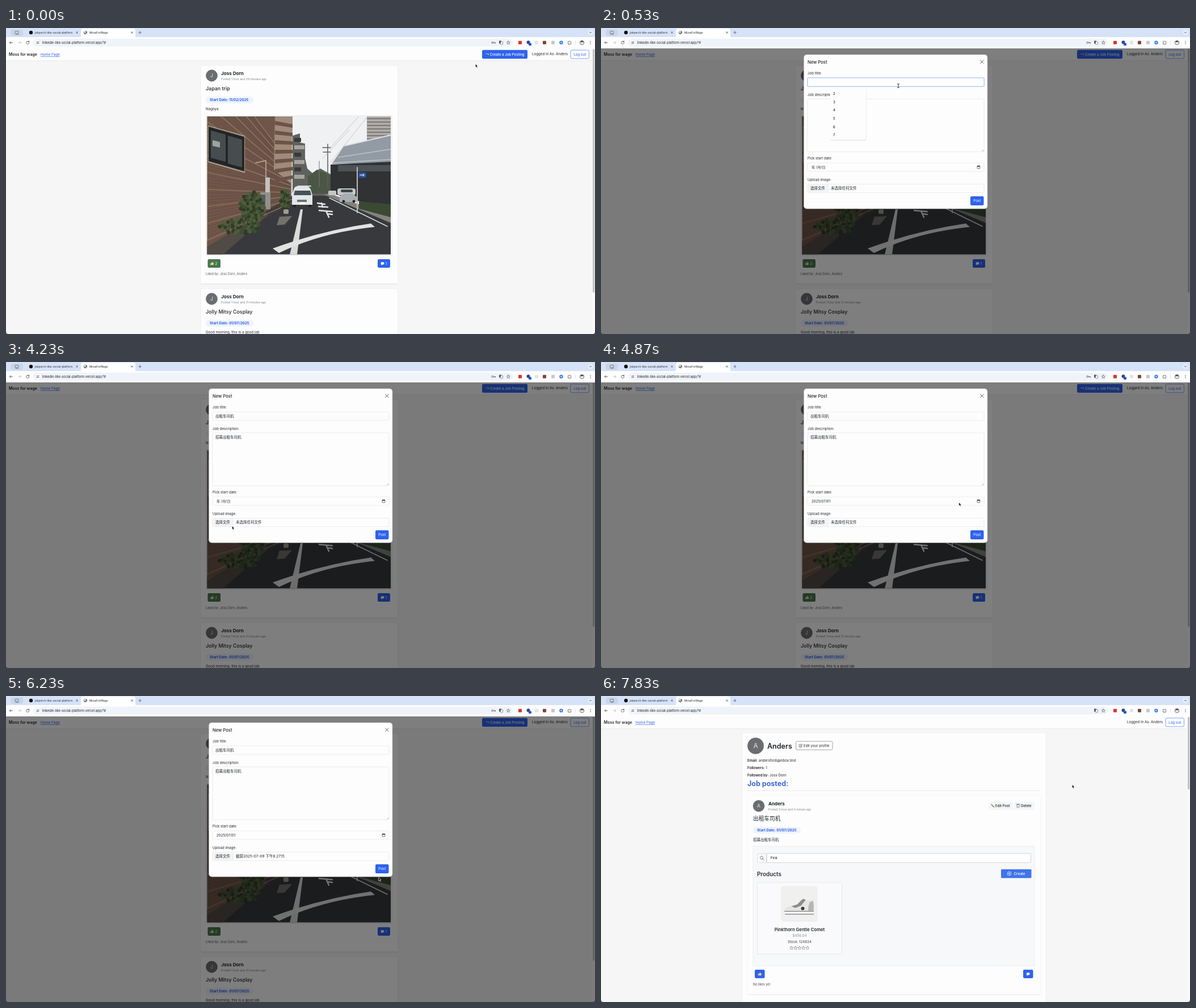
Recreate the animation shown at these times as an HTML page. Size 1038x540 px, loop 7860 ms.

```html
<!DOCTYPE html>
<html lang="en">
<head>
<meta charset="utf-8">
<title>MossForWage</title>
<style>
html, body { margin: 0; width: 100%; height: 100%; overflow: hidden; background: #f6f6f7; }
svg { display: block; width: 1038px; height: 540px; }
text { font-family: Inter, "Noto Sans CJK SC", "Noto Sans CJK", "Noto Sans", sans-serif; white-space: pre; }
</style>
</head>
<body>
<svg id="stage" viewBox="0 0 1038 540"></svg>
<script>
const INK = '#212529', BLUE = '#2f63ed', PAPER = '#fdfdfd', LINE = '#dfe1e4';
const USER = 'Anders', AUTHOR = 'Joss Dorn';
const HAN = '出租车司机', HAN_DESC = '招募出租车司机', SHOT = '下午8.27.15';

// Drawing helpers
const text = (x, y, s, size = 6.2, fill = INK, weight = 400, anchor = 'start', extra = '') =>
  `<text x="${x}" y="${y}" font-size="${size}" fill="${fill}" font-weight="${weight}" text-anchor="${anchor}" ${extra}>${s}</text>`;
const mid = (x, y, s, size, fill, weight) => text(x, y, s, size, fill, weight, 'middle');
const box = (x, y, w, h, fill, r = 0, stroke = 'none', extra = '') =>
  `<rect x="${x}" y="${y}" width="${w}" height="${h}" rx="${r}" fill="${fill}" stroke="${stroke}" stroke-width=".6" ${extra}/>`;
const dot = (x, y, r, fill, stroke = 'none', w = .8) =>
  `<circle cx="${x}" cy="${y}" r="${r}" fill="${fill}" stroke="${stroke}" stroke-width="${w}"/>`;
const shape = (d, fill) => `<path d="${d}" fill="${fill}"/>`;
const line = (d, stroke = INK, w = .8) =>
  `<path d="${d}" fill="none" stroke="${stroke}" stroke-width="${w}" stroke-linecap="round" stroke-linejoin="round"/>`;
const group = (id, body, extra = '') => `<g id="${id}" ${extra}>${body}</g>`;
const repeat = (n, fn) => Array.from({ length: n }, (_, i) => fn(i)).join('');

const cross = (x, y, r, c = '#444', w = .7) =>
  line(`M${x - r} ${y - r}l${2 * r} ${2 * r}m0 ${-2 * r}l${-2 * r} ${2 * r}`, c, w);
const avatar = (x, y, r, s) => dot(x, y, r, '#6c6d71') + mid(x, y + r * .28, s, r * .82, '#e6e6e6');
const badge = (x, y, date) => box(x, y, 84, 12, '#eef3fd', 6) +
  text(x + 7, y + 8.2, `Start Date: ${date}`, 6.25, '#2d5fe3', 650);
const thumb = (x, y, c) =>
  shape(`M${x - 3} ${y - .5}h1.6v3.2h-1.6zM${x - 1} ${y - .5}l1.5-2.5q1.2 0 .6 2h1.8q.7.3.2 1.4l-.6 1.8q-.3.6-1 .6h-2.5z`, c);
const bubble = (x, y, c = '#fff') =>
  `<ellipse cx="${x}" cy="${y}" rx="2.9" ry="2.3" fill="${c}"/>` + shape(`M${x - 2} ${y + 1}l-.4 2.2 2.4-1z`, c);
const lens = (x, y, r, c) => dot(x, y, r, 'none', c, .7) + line(`M${x + r * .7} ${y + r * .7}l${r * .9} ${r * .9}`, c, .7);

function chrome() {
  const ext = [[906, '#d8332c'], [935, '#e2e4e6'], [949, '#7b4433'], [964, '#c4c8cc']];
  return box(0, 0, 1038, 17, '#d5e2f8') +
    box(8, 2.5, 22, 11.5, '#c9d5e8', 4) + box(16, 5.5, 6, 4.4, 'none', .8, '#444') + line('M17 11.2h5', '#444', .6) +
    dot(44, 8, 3.2, '#111') + text(50.5, 10, 'jobperch-like-social-platform', 4.85, '#333') + cross(125, 8, 1.5) +
    shape('M129 17q3 0 3-3v-9q0-4 4-4h88q4 0 4 4v9q0 3 3 3z', '#fff') +
    dot(140, 8, 3, '#5f6368') + shape('M138 6q2-1 3 0l-1 2-2 1zM140 9l2-.5-.5 2z', '#fff') +
    text(147, 10, 'MossForWage', 4.8, '#222') + cross(222, 8, 1.5) +
    line('M236 5.8v4.4m-2.2-2.2h4.4', '#444', .7) +
    dot(1030, 8, 5, '#e3ecfb') + line('M1028.5 7.3l1.5 1.5 1.5-1.5', '#333') +
    box(0, 16, 1038, 20, PAPER) + box(48, 19, 845, 13.5, '#eff3fa', 6.7) +
    line('M11.5 25.8h-5m2-2l-2 2 2 2', '#444') + line('M21.5 25.8h5m-2-2l2 2-2 2', '#b5b7ba') +
    line('M40.2 24.2a2.6 2.6 0 1 0 .6 2M40.6 22.8v1.9h-1.9', '#444') +
    dot(56, 25.8, 4.4, '#fff') + line('M53.8 24.6h2.6m1.6 0h.2M53.8 27.2h.2m1.8 0h2.6', '#444', .7) +
    dot(57, 24.6, .8, '#fff', '#444', .6) + dot(55, 27.2, .8, '#fff', '#444', .6) +
    text(64, 27.8, 'linkedin-like-social-platform.vercel.app/?#', 5.6, '#222') +
    group('key', dot(857.3, 25.8, 1.5, 'none', '#555') + line('M859 25.8h3.6v1.3m-1.4-1.3v1', '#555')) +
    box(869, 22.5, 4, 5, '#555', .6) + box(871.5, 24, 4, 5, PAPER, .6, '#555') +
    line('M885.3 22.8l.9 2 2.1.2-1.6 1.4.5 2.1-1.9-1.1-1.9 1.1.5-2.1-1.6-1.4 2.1-.2z', '#444', .6) +
    ext.map(([x, c]) => box(x - 3, 22.8, 6, 6, c, 1)).join('') +
    dot(920.5, 25.2, 3, '#274a8e') + box(921, 26.5, 5, 4.5, '#2456c9', 1) +
    dot(978.5, 25.8, 3.2, '#3c7bea') + dot(978.5, 25.8, 1.2, '#dce8ff') +
    line('M991 23.8h1.4q.8-1.8 1.6 0h1.4v1.7q1.6.7 0 1.4v1.6h-4.4z', '#444', .7) +
    line('M1003.5 22.5v6.5', '#c7d6f2', .7) + dot(1015, 25.8, 3.7, '#e9e9e9', '#555', .8) + shape('M1012 25q3-5 6 0z', '#444') +
    repeat(3, i => dot(1030, 23.7 + i * 2.1, .65, '#444'));
}

function header() {
  return box(0, 36, 1038, 21.5, PAPER) + line('M0 57.7h1038', '#e4e5e7', .7) +
    text(5, 49, 'Moss for wage', 7, INK, 600) +
    text(61, 49, 'Home Page', 6.2, BLUE, 400, 'start', 'text-decoration="underline"') +
    group('create', box(839, 38.8, 80, 15.4, BLUE, 2.2) + box(845, 45, 6, 2.8, '#9fb3d8', .6) +
      box(845, 46.4, 4, 1.4, '#5c4a3c') + text(853, 48.7, 'Create a Job Posting', 6.1, '#fff', 500)) +
    text(990, 48.2, `Logged In As: ${USER}`, 6.2, INK, 400, 'end') +
    box(995, 39, 32.5, 15, PAPER, 2.2, BLUE) + mid(1011.2, 48.9, 'Log out', 6.2, BLUE);
}

function photo() {
  const bricks = repeat(58, i => {
    const y = 45 + i * 6;
    return line(`M354 ${y}L503 ${y + (292 - y) * .8}`, i % 5 ? '#5d463b' : '#917b69', i % 5 ? .6 : 1.2);
  });
  const leaf = (x, y, rx, ry, n, seed) => repeat(n, i => {
    const a = i * 2.4 + seed, k = Math.sqrt((i + .5) / n);
    return dot(x + Math.cos(a) * rx * k, y + Math.sin(a) * ry * k, 3.2, ['#2f3b28', '#4a5e37', '#3c4d30'][i % 3]);
  });
  return box(352.5, 154.5, 327.5, 247, '#f3f3f3', 1, '#e0e2e4') +
    `<clipPath id="pic"><rect x="354.5" y="156" width="323.5" height="243.5"/></clipPath><g clip-path="url(#pic)">` +
    box(354, 156, 324, 244, '#eff1f3') +
    // middle distance
    shape('M505 190l13-4v16l9 2v26l4 18 9 8 14-8 18 10 6 40h-73z', '#5f625c') +
    shape('M532 262l16-12 24 10v32h-40z', '#4c5646') +
    repeat(6, i => box(508, 194 + i * 13, 12 + i % 2 * 6, 7, i % 2 ? '#a7a49e' : '#363a3c')) +
    shape('M354 400V385L500 296H568L678 342V400z', '#37393c') +
    shape('M354 376L455 322 462 330 382 400H354z', '#514b46') +
    // brick building
    shape('M354 156H505L502 297 354 386z', '#705649') + bricks +
    shape('M474 156H505L503 275 472 250z', '#a08a79') +
    repeat(7, i => shape(`M474 ${164 + i * 17}L505 ${170 + i * 15}V${176 + i * 15}L474 ${171 + i * 17}z`, '#6d5347')) +
    shape('M356 172L421 190V256L356 237z', '#a79c90') + shape('M357 174L420 192V253L357 235z', '#232525') +
    shape('M361 181L387 188V236L361 229zM391 190L416 197V246L391 239z', '#474d4f') +
    shape('M364 198l13 3v10l-13-3z', '#9da39f') +
    line('M440 238l18-4v32', '#b39a86', 2) + box(457, 264, 8, 32, '#c3c2be') + box(448, 290, 18, 30, '#92918d') +
    box(449, 294, 8, 22, '#5b5c5a') +
    leaf(434, 316, 22, 27, 60, 0) + leaf(412, 350, 36, 14, 50, 1) + leaf(492, 304, 8, 20, 28, 2) +
    box(489, 320, 9, 8, '#a09a90', 2) + shape('M482 333l22-1-13 15-14 1z', '#73716b') +
    // right side
    box(636, 156, 42, 48, '#aeaba8') + repeat(7, i => line(`M637 ${160 + i * 6}h41`, '#7b7977', 2)) +
    shape('M574 240L596 208 678 189V238z', '#929aa4') + line('M586 228L678 214M576 238L678 232', '#bcc3ca', 1.5) +
    line('M596 208L678 189', '#dfe3e6', 2) +
    shape('M572 241L678 236V325L630 308 572 291z', '#303233') + box(585, 242, 93, 11, '#4d5256') +
    shape('M570 292L678 332V344L560 294z', '#83837e') + shape('M622 306L678 311V334L622 319z', '#3b4933') +
    box(584, 283, 32, 12, '#c8c9c9', 4) + box(590, 285, 21, 5, '#43484c', 2) +
    shape('M588 298l7-6h15l8 6v9h-30z', '#a7adb0') + dot(595, 306, 2.4, '#222') + dot(613, 306, 2.4, '#222') +
    box(568, 287, 14, 8, '#c6c8c8', 2) +
    line('M567 205V283M558 211h14m-13 8h13', '#5c5d5c', 1.5) + line('M552 235v45', '#777', 1) +
    line('M636 158L572 237M622 156L570 213M605 180L558 230', '#a6a9ac', .6) +
    line('M619 246V326', '#b9bcbd', 2) + box(621.5, 255, 13, 9, '#2a57ad', 1) + line('M624 259.5h7m-2-2l2 2-2 2', '#fff', 1) +
    // van and road paint
    shape('M507 285q1-5 6-6h17q5 1 7 6l3 10v17h-36v-17z', '#e4e6e7') + shape('M509 287h27l2 8h-31z', '#45515b') +
    line('M515 279h22', '#d8dadb', 2) + box(513, 303, 17, 4, '#6c7071') + box(518, 308, 8, 3, '#fff') +
    box(506, 312, 5, 4, '#222') + box(533, 312, 5, 4, '#222') +
    shape('M519 320h4L513 400h-13z', '#d9dbd9') + shape('M470 389L481 397Q555 361 650 351L643 345Q558 357 470 389z', '#e2e3e1') +
    line('M549 309l13 2m-11 4l16 1m-11-7l2 7m-6 6l23 2m-11-1l5 11m-1-6l7 1', '#e4e5e3', 2.4) +
    line('M570 300L672 350', '#d9dbd9', 1.5) + '</g>';
}

const card = (y, ago, title, date, body) =>
  box(343, y, 347.5, 385, PAPER, 2, '#e9eaec') + avatar(362.5, y + 18, 10.4, 'J') +
  text(379, y + 17, AUTHOR, 8.1, INK, 650) + text(379, y + 26.2, `Posted 1 hour and ${ago} minutes ago`, 5, '#7c7f83') +
  text(352, y + 44, title, 8.9, INK, 550) + badge(352, y + 55, date) + text(352, y + 79.3, body, 6.2);

function home() {
  return card(66, 29, 'Japan trip', '11/02/2025', 'Nagoya') + photo() +
    box(355.5, 408, 22.5, 15, '#47774f', 2.2) + thumb(363, 415.5, '#e9d9a0') + text(368.5, 417.8, '2', 6.2, '#fff') +
    box(655, 408, 22, 15, BLUE, 2.2) + bubble(663.5, 415.2) + text(668.5, 417.8, '1', 6.2, '#fff') +
    text(352, 436.2, `Liked by: ${AUTHOR}, ${USER}`, 5.5, '#5a5d61') + line('M343 452h348', '#e4e5e7', 1) +
    card(460, 31, 'Jolly Mitsy Cosplay', '01/07/2025', 'Good morning, this is a good job');
}

const shoe = (x, y, k) => `<g transform="translate(${x} ${y}) scale(${k})">` +
  shape('M-26 8q-1-6 7-8l15-4 9-9q4-2 7 1 6 3 12-1 2 8 1 21z', '#e4e4e2') +
  shape('M-14-1l10-3 9-9q4-2 6 1l-8 10-10 4z', '#8a8c8e') +
  shape('M19-9q4 0 5-2 2 8 1 19h-9q-1-8 3-17z', '#b4b5b4') + dot(6, 3, 3, '#33363a') +
  shape('M-26 7h51v6h-49q-3-2-2-6z', '#fafafa') + line('M-25 13h50M-26 8h51', '#55575a', 1.2) + '</g>';

function profile() {
  const fact = (y, k, v) => text(258, y, `<tspan font-weight="600">${k}:</tspan> ${v}`, 6.15);
  const star = i => line(`M${335.7 + i * 7} 441.4l.9 2.1 2.2.2-1.7 1.5.5 2.2-1.9-1.2-1.9 1.2.5-2.2-1.7-1.5 2.2-.2z`, '#777b80', .6);
  return box(249, 65, 535, 480, PAPER, 2, '#ecedef') + avatar(272.5, 88, 14.4, 'A') +
    text(293, 93, USER, 12.5, INK, 600) + box(343.5, 80, 64.5, 15, PAPER, 2.2, '#666') +
    box(349, 85, 5, 5.5, '#d4d6d8', 1, '#777') + line('M351.5 89l3.5-4', '#87755a') + text(357, 90, 'Edit your profile', 6.1) +
    fact(115.6, 'Email', 'andersford@inbox.test') + fact(128.6, 'Followers', '1') + fact(141.6, 'Followed by', AUTHOR) +
    text(258, 159, 'Job posted:', 12.5, '#3b67d7', 700) + line('M258 167h516', '#dcdee1', .7) +
    box(258, 174.5, 517, 352.5, PAPER, 2, '#f0f1f3') + avatar(278, 194, 10.3, 'A') +
    text(295, 193, USER, 8.1, INK, 650) + text(295, 202.2, 'Posted 0 hour and 0 minute ago', 5, '#7c7f83') +
    box(683, 187, 43, 14, '#f5f6f7', 2) + line('M688 191.5l4.5 4.5', '#88765f', 1.4) + text(695, 196.2, 'Edit Post', 6.1, INK, 500) +
    box(728, 187, 36, 14, '#f5f6f7', 2) + box(733, 191.7, 4, 5, '#eee', .5, '#555') + line('M732 191h6', '#555') + text(740, 196.2, 'Delete', 6.1, INK, 500) +
    text(268, 220, HAN, 9.7, INK, 500) + badge(268, 231, '01/07/2025') + text(268, 255.5, HAN_DESC, 6.5) +
    box(268, 264.8, 496, 211.5, '#f7f8fa', 1, '#e3e5e8') +
    box(275.5, 278, 16, 16, '#f9fafb', 1.5, '#c9ccd0') + lens(283, 285.4, 2.6, '#555') +
    box(292, 278, 465.5, 16, '#fff', 1.5, '#b4b7bb') + text(298.5, 288.4, 'Pink', 6.2) +
    text(275, 317.6, 'Products', 9.9, '#2b3036', 600) + box(705, 305.8, 53.5, 15.5, '#3f74ec', 1.5) +
    dot(719.5, 313.5, 3.4, 'none', '#fff', .7) + line('M719.5 311.8v3.4m-1.7-1.7h3.4', '#fff', .7) + text(727.5, 315.8, 'Create', 6.3, '#fff', 500) +
    box(275.5, 329, 149, 126.5, '#fafafc', 1.5, '#d9dce0') + box(318, 336, 63, 61.5, '#f0f0ef', 4, '#e6e6e6') +
    shoe(349.5, 372, 1) + mid(350, 415, 'Pinkthorn Gentle Comet', 7.7, INK, 600) + mid(350, 425, '$456.04', 6.2, '#8c9095') +
    mid(350, 435.6, 'Stock: 124834', 6.1, '#555a60', 500) + repeat(5, star) +
    box(271, 483, 17.5, 15, BLUE, 2.2) + thumb(279.7, 490.5, '#f3d784') + box(744, 483, 17.5, 15, BLUE, 2.2) + bubble(752.7, 490.2) +
    text(268, 511.4, 'No likes yet', 5.5, '#4c5055') + line('M258 527h516', '#e4e6e8', .7);
}

function modal() {
  const field = (y, h) => box(364, y, 311, h, PAPER, 2.2, LINE);
  const ring = (id, y, h) => group(id, box(363, y - 1, 313, h + 2, '#c7d7fb', 3) + box(364, y, 311, h, PAPER, 2.2, '#90b1f4'));
  return box(357.5, 47, 323.5, 272, PAPER, 5, '#b5b5b5') + text(364, 62.6, 'New Post', 7.6, INK, 500) + cross(671.3, 59.7, 2.8, '#333', .8) +
    text(364, 82.4, 'Job title:', 6.15) + field(88, 15) + ring('ringTitle', 88, 15) + text(369, 98, '', 6.5, INK, 500, 'start', 'id="title"') +
    text(364, 119.7, 'Job description:', 6.15) + field(125, 93.5) + ring('ringDesc', 125, 93.5) +
    text(369, 135.2, '', 6.5, INK, 400, 'start', 'id="desc"') + group('caret', line('M369.4 128.8v7.6', '#222', .6)) +
    line('M671.5 217.3l2.5-2.5M673 217.3l1-1', '#888', .5) +
    text(364, 232.2, 'Pick start date:', 6.15) + field(238, 15) + text(371, 248.2, '', 6.2, INK, 400, 'start', 'id="date"') +
    box(663, 243.4, 4.8, 4.8, 'none', .5, '#222') + box(663, 243, 4.8, 1.6, '#222') +
    text(364, 269.9, 'Upload image:', 6.15) + field(275.5, 15) + box(364.3, 275.8, 36, 14.4, '#f3f4f5', 2) + line('M400.5 276v14', LINE, .5) +
    text(369, 285.3, '选择文件', 6.5) + text(405, 285.3, '', 6.5, INK, 400, 'start', 'id="file"') +
    box(651, 297, 23.5, 16, BLUE, 2.2) + mid(662.7, 307.2, 'Post', 6.2, '#fff') +
    group('hints', box(404, 106, 63.5, 92.5, '#0002', 4) + box(404, 105.5, 63, 92, PAPER, 3.5) +
      repeat(6, i => text(409, 118.2 + i * 14.6, i + 2, 6, INK, 500)));
}

function dialog() {
  const small = (x, y, s, size = 5.2, fill = '#222', w = 400, anchor) => text(x, y + size * .36, s, size, fill, w, anchor);
  const head = (x, y, s) => small(x, y, s, 4.4, '#888');
  const side = [[198, '桌面'], [209.5, '最近使用'], [220.5, '应用程序'], [232, '文稿'], [243, '下载'],
    [268, 'Skyvel云盘'], [279, '共享'], [303.5, 'Brinto'], [315, '网络']];
  const files = [[223, 'DSC08622.JPG'], [232, 'nagoya_c.jpg'], [241, 'nagoya.jpg']];
  const folder = (x, y, c) => shape(`M${x - 2.7} ${y - 2}h2l.7.8h2.7v3.4h-5.4z`, c);
  const button = (x, w, s, blue) => box(x, 344, w, 9, blue ? '#2458d4' : '#fff', 2, blue ? 'none' : '#d2d2d2') +
    mid(x + w / 2, 350.5, s, 5.3, blue ? '#fff' : '#222', 500);
  return box(356.5, 178.7, 326, 183, '#0002', 5) + box(357, 179, 325, 182, PAPER, 4) +
    shape('M361 179H415V361H361q-4 0-4-4V183q0-4 4-4z', '#e8e8e9') + box(361, 192.3, 44, 11.2, '#d0d0d2', 2) +
    head(363, 188, '个人收藏') + head(363, 258.5, 'Skyvel') + head(363, 294, '位置') + head(363, 330, '标签') +
    side.map(([y, s]) => box(365.5, y - 1.8, 4.2, 3.6, '#9cbcf0', 1, '#2f6de0') + small(373, y, s)).join('') +
    dot(367.5, 339.3, 2, '#e5443c') + small(373, 339.5, '红色') + dot(367.5, 350.7, 2, '#f0923a') + small(373, 351, '橙色') +
    dot(367.5, 360, 1, '#f1c843') + box(410.5, 181, 3.2, 118, '#b5b5b7', 1.6) +
    line('M429 189.3l-2 2.2 2 2.2M437.5 189.3l2 2.2-2 2.2', '#c2c2c2', .7) +
    box(450, 189.2, 6, 4.6, 'none', .5, '#555') + line('M452 189.2v4.6m2-4.6v4.6', '#555', .5) + line('M459.5 191l1.2 1.2 1.2-1.2', '#555', .7) +
    repeat(6, i => box(472 + i % 3 * 2.1, 189.5 + (i > 2 ? 2.3 : 0), 1.5, 1.6, '#666')) + line('M480.7 191l1.2 1.2 1.2-1.2', '#555', .7) +
    box(507, 187, 85, 9, '#fff', 2, '#ededed') + folder(513, 191.7, '#3b8be8') + small(518, 191.5, '桌面') +
    box(583.5, 188.5, 6.4, 6, '#2c66dc', 1.5) + line('M585.5 191l1.2-1.2 1.2 1.2m-2.4 1.2l1.2 1.2 1.2-1.2', '#fff', .6) +
    box(611.5, 187, 62, 9, '#fff', 2, '#e8e8e8') + lens(616.3, 191, 1.8, '#555') + small(622, 191.5, '搜索', 5.2, '#aaa') +
    line('M415 204.5H681M415 337H681M514.5 205v132', '#e2e2e2', .5) +
    head(430, 210, '昨天') + head(430, 261.5, '过去7天') + head(430, 290, '五月') + head(430, 329, '二月') +
    files.map(([y, s]) => folder(425, y, '#333') + small(430.5, y, s, 5.5)).join('') +
    box(419.5, 266.7, 85.5, 9.2, '#2258d6', 1.5) + box(422, 269.5, 6, 3.4, '#e8effc') + small(430.5, 271.2, '截屏 2025-0...9 ' + SHOT, 5.4, '#fff') +
    folder(425, 299.5, '#4a97ea') + small(430.5, 299.5, '日语') + line('M501 298.5l1 1-1 1', '#aaa', .5) +
    box(423, 306, 4, 5, '#eee', .4, '#ddd') + small(430.5, 308.5, 'file.txt', 5.2, '#c2c2c2') +
    box(510.6, 206, 2.8, 53, '#b9b9bb', 1.4) + box(677.4, 206, 2.8, 89, '#b9b9bb', 1.4) +
    box(519, 219, 152.5, 63.5, '#f9fafb', 1, '#dcdcdc') + box(521, 222, 149, 4.4, '#fff', .5, '#cfd2d6') + small(527, 224.2, 'Pink', 2.2) +
    small(521, 233, 'Products', 3.3, '#222', 600) + box(653.5, 230.5, 17, 5, '#3f74ec', .5) + mid(662, 234, 'Create', 2.4, '#fff') +
    box(520.5, 237.5, 46.5, 39.5, '#fcfcfd', .6, '#dcdfe3') + box(534, 240, 20, 19, '#f0f0ef', 1) + shoe(543.8, 250.5, .36) +
    mid(543.7, 264.6, 'Pinkthorn Gentle Comet', 2.4, INK, 600) + mid(543.7, 268, '$456.04', 2, '#888') + mid(543.7, 271.2, 'Stock: 124834', 2, '#555') +
    small(519, 307, '截屏 2025-07-09 ' + SHOT, 6.1, '#222', 600) + small(519, 315.3, 'PNG图像 - 107KB', 5.1, '#777') +
    small(519, 325, '信息', 5.3, '#222', 600) + small(671.5, 325, '更多内容', 4.6, '#2866dc', 400, 'end') +
    small(519, 334, '创建时间', 4.3, '#888') + small(671.5, 334, '2025年7月9日 星期三 下午8:27', 4.6, '#222', 400, 'end') +
    button(422.5, 34, '显示选项') + button(611.5, 29, '取消') + button(644, 29.5, '打开', true);
}

const pointer = group('cursor',
  group('arrow', '<path d="M-1.7-3.6V2.4L-.3 1.2.7 3.5 1.9 3 .9.8H2.8z" fill="#111" stroke="#fff" stroke-width=".6"/>') +
  group('beam', line('M-1.6-3.4Q0-3.4 0-2.4Q0-3.4 1.6-3.4M0-2.6V2.6M-1.6 3.4Q0 3.4 0 2.4Q0 3.4 1.6 3.4', '#111', .8)));

document.getElementById('stage').innerHTML =
  box(0, 0, 1038, 540, '#f6f6f7') + group('home', home()) + group('profile', profile()) + header() +
  box(1033, 36, 5, 504, '#fafafa') + box(1034, 37, 3.2, 430, '#bfc1c3', 1.6, 'none', 'id="bar"') +
  box(0, 36, 1038, 504, '#000', 0, 'none', 'id="shade"') + chrome() +
  group('modal', modal()) + box(0, 0, 1038, 540, '#aaa', 0, 'none', 'id="dim"') + group('dialog', dialog()) + pointer +
  shape('M0 536v4h4q-4 0-4-4zM1038 536v4h-4q4 0 4-4z', '#333');

// Timeline
const LOOP = 7860;
const PATH = [[0, 829, 67], [30, 829, 67], [180, 876, 48], [270, 874, 50], [480, 524, 102], [1950, 524, 102],
  [2300, 513, 151], [3650, 513, 151], [4150, 400, 293], [4340, 400, 293], [4600, 665, 247], [4820, 665, 247],
  [5060, 385, 285], [5240, 385, 285], [5480, 462, 272], [5640, 462, 272], [5940, 653, 349], [6080, 653, 349],
  [6350, 662, 306], [6480, 662, 306], [6870, 861, 378], [6975, 861, 378], [7120, 964, 47], [7240, 964, 47], [7620, 832, 160]];
const el = {};
document.querySelectorAll('[id]').forEach(n => el[n.id] = n);

const ramp = (t, a, b) => Math.min(1, Math.max(0, (t - a) / (b - a)));
const easeOut = k => 1 - (1 - k) ** 2;
const between = (t, a, b) => t >= a && t < b;
const fade = (id, k) => { el[id].style.display = k > 0 ? '' : 'none'; el[id].style.opacity = k; };

function cursorAt(t) {
  const i = PATH.findIndex(p => p[0] > t);
  if (i < 0) return PATH[PATH.length - 1].slice(1);
  const [a, x, y] = PATH[i - 1], [b, u, v] = PATH[i];
  const k = (t - a) / (b - a), e = k * k * (3 - 2 * k);
  return [x + (u - x) * e, y + (v - y) * e];
}

// Pinyin is typed underlined, then becomes the finished characters.
function compose(id, t, start, end, pinyin, done) {
  const typing = t < end;
  el[id].textContent = t > 6935 ? '' : typing ? pinyin.slice(0, Math.ceil(pinyin.length * ramp(t, start, end - 150))) : done;
  el[id].setAttribute('text-decoration', typing ? 'underline' : 'none');
}

function draw(t) {
  const open = ramp(t, 250, 330), close = ramp(t, 6943, 7011);
  fade('modal', open * (1 - close));
  const lift = 21 * (1 - easeOut(open)) + 21 * easeOut(ramp(t, 6943, 7150));
  el.modal.setAttribute('transform', `translate(0 ${-lift})`);
  fade('shade', .5 * ramp(t, 230, 300) * (1 - ramp(t, 7020, 7085)));

  const onProfile = t >= 7170;
  fade('home', onProfile ? 0 : 1);
  fade('profile', onProfile ? 1 : 0);
  fade('create', onProfile ? 0 : 1);
  fade('key', onProfile ? 0 : 1);
  el.bar.setAttribute('height', onProfile ? 128 : 430);

  compose('title', t, 800, 1850, 'chu zu che si ji', HAN);
  compose('desc', t, 2620, 3600, 'zhao mu chu zu che si ji', HAN_DESC);
  el.date.textContent = between(t, 4780, 6935) ? '2025/07/01' : '年 /月/日';
  el.file.textContent = t < 6100 ? '未选择任何文件' : '截屏2025-07-09 ' + SHOT;
  fade('ringTitle', between(t, 430, 2250) ? 1 : 0);
  fade('ringDesc', between(t, 2250, 4000) ? 1 : 0);
  fade('caret', between(t, 2250, 2620) ? 1 : 0);
  fade('hints', between(t, 490, 800) ? 1 : 0);

  const sheet = ramp(t, 5180, 5260) * (1 - ramp(t, 6060, 6120));
  fade('dim', .65 * sheet);
  fade('dialog', sheet);

  const beam = between(t, 440, 4000);
  fade('beam', beam ? 1 : 0);
  fade('arrow', beam ? 0 : 1);
  el.cursor.setAttribute('transform', `translate(${cursorAt(t).join(' ')})`);
}

const begin = performance.now();
(function tick() {
  draw((performance.now() - begin) % LOOP);
  requestAnimationFrame(tick);
})();
</script>
</body>
</html>
```
